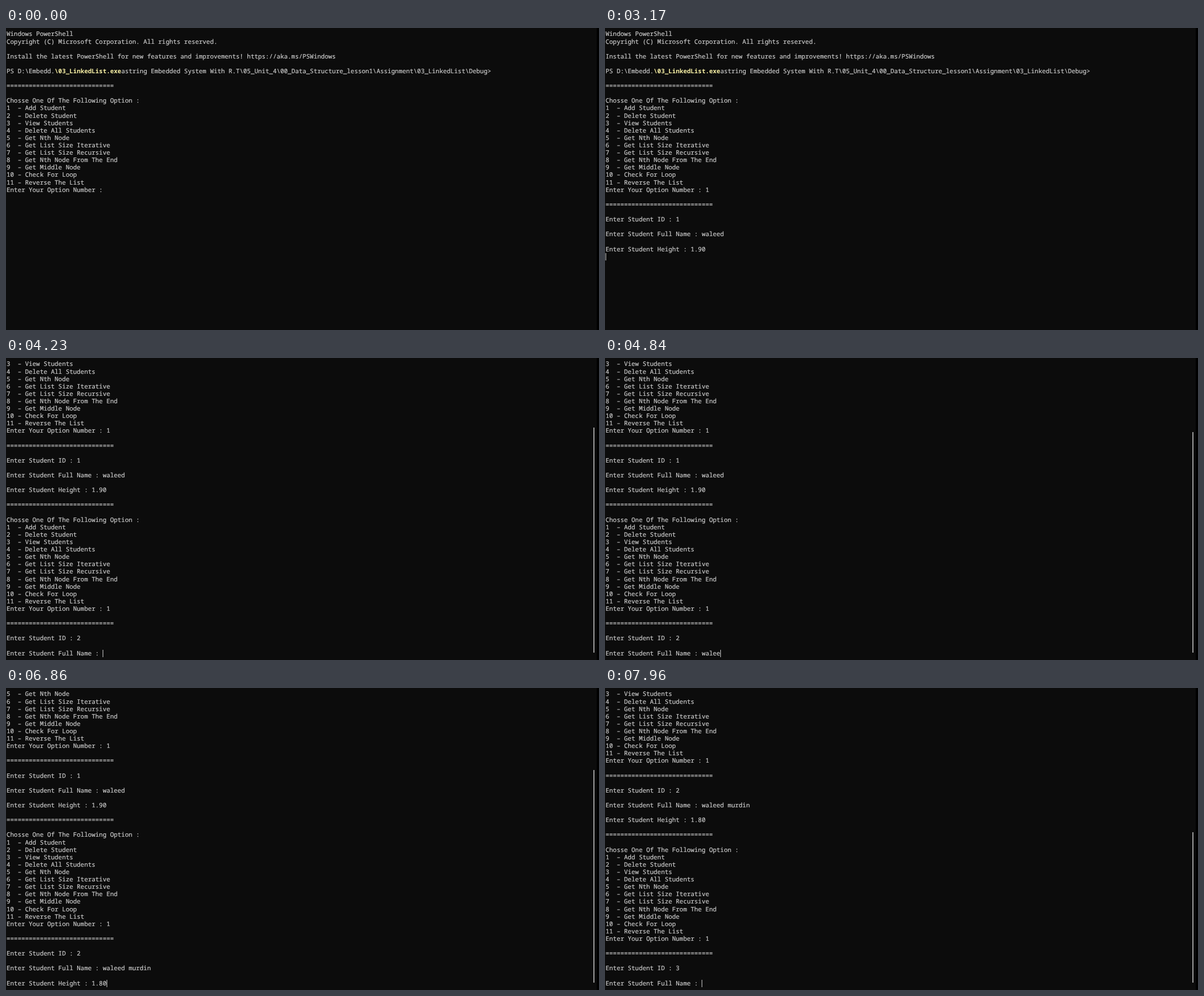
An HTML page that plays this animation: 1049 by 534 pixels, repeating every 8000 ms.

```html
<!DOCTYPE html>
<html lang="en">
<head>
<meta charset="utf-8">
<title>Linked list console</title>
<style>
  html, body { margin: 0; width: 100%; height: 100%; overflow: hidden; background: #0c0c0c; }
  #stage { position: relative; width: 1049px; height: 534px; overflow: hidden; }
  #stage > * { position: absolute; }
  pre {
    left: 1px; top: 4.4px; margin: 0; color: #ccc;
    font: 500 10.927px/13.112px "Noto Sans Mono", "DejaVu Sans Mono", monospace;
    text-rendering: geometricPrecision; font-variant-ligatures: none;
    -webkit-text-stroke: .2px;
  }
  b { color: #f9f1a5; -webkit-text-stroke: 0; }
  #caret { width: 1px; height: 13px; background: #ccc; }
  #edge { left: 1045px; top: 0; width: 4px; height: 534px; background: #000; }
  #thumb { left: 1039px; width: 2px; background: #9c9c9c; }
  #pointer { left: 0; top: 0; }
</style>
</head>
<body>
<div id="stage">
  <pre id="screen"></pre>
  <div id="caret"></div>
  <div id="edge"></div>
  <div id="thumb"></div>
  <svg id="pointer" width="5" height="9"><path d="M.5 .5h4M2.5 .5v8M.5 8.5h4" stroke="#ddd" fill="none"/></svg>
</div>
<script>
const LOOP = 8000, ROWS = 40, COL = 6.556, ROW = 13.112;
const [screenEl, caret, thumb, pointer] =
  ['screen', 'caret', 'thumb', 'pointer'].map(id => document.getElementById(id));

const RULE = '\n' + '='.repeat(29) + '\n';
const OPTIONS = ['Add Student', 'Delete Student', 'View Students', 'Delete All Students',
  'Get Nth Node', 'Get List Size Iterative', 'Get List Size Recursive',
  'Get Nth Node From The End', 'Get Middle Node', 'Check For Loop', 'Reverse The List'];
const MENU = RULE + '\nChosse One Of The Following Option :\n' +
  OPTIONS.map((label, i) => `${i + 1}`.padEnd(3) + `– ${label}\n`).join('') +
  'Enter Your Option Number : ';
const ID = '\nEnter Student ID : ';
const NAME = '\nEnter Student Full Name : ';
const HEIGHT = '\nEnter Student Height : ';
const COMMAND = String.raw`\03_LinkedList.exe`;
const INTRO = String.raw`Windows PowerShell
Copyright (C) Microsoft Corporation. All rights reserved.

Install the latest PowerShell for new features and improvements! https://aka.ms/PSWindows

PS D:\Embedd.${COMMAND}astring Embedded System With R.T\05_Unit_4\00_Data_Structure_lesson1\Assignment\03_LinkedList\Debug>
`;

// Spreads keystrokes evenly from start, one every step ms.
const type = (text, start, step) => [...text].map((key, i) => [start + i * step, key]);

// '\b' removes the last character.
const OUTPUT = [
  [0, INTRO + MENU],
  [1630, '1'], [1730, '\n'], [1830, RULE], [1920, ID],
  [2040, '1'], [2075, '\n'], [2110, NAME],
  ...type('waleed', 2270, 48), [2580, '\n'], [2670, HEIGHT],
  ...type('1.90', 2840, 65), [3120, '\n'], [3230, MENU],
  [3540, '1'], [3610, '\n'], [3690, RULE], [3870, ID],
  [4030, '2'], [4130, '\n'], [4230, NAME],
  ...type('walee', 4500, 80), ...type('d murdn', 4870, 45),
  [5280, '\b'], [5380, 'i'], [5480, 'n'], [6020, '\n'], [6120, HEIGHT],
  [6480, '1'], ...type('.80', 6660, 80), [6920, '\n'], [7010, MENU],
  [7500, '1'], [7590, '\n'], [7680, RULE + ID],
  [7770, '3'], [7870, '\n' + NAME]
];

// The scrollbar only catches up with the text at these moments.
const SCROLL_SYNC = [0, 3350, 3540, 3770, 3870, 4130, 4330, 6120, 7040, 7590, 7680, 7960];
const CARET_OFF = [[0, 870], [5720, 5880], [6310, 6480], [7210, 7300]];

function linesAt(time) {
  let text = '';
  for (const [at, chunk] of OUTPUT) {
    if (at > time) break;
    text = chunk === '\b' ? text.slice(0, -1) : text + chunk;
  }
  return text.split('\n');
}

function drawPointer(time) {
  pointer.style.display = time >= 30 && time < 1630 ? '' : 'none';
  const t = Math.floor((time - 30) / 92) * 92;
  const enter = 1 - (1 - Math.min(1, t / 736)) ** 2;
  const drift = Math.max(0, Math.min(1, (t - 736) / 720));
  const x = 909 - 546 * enter - 37 * drift;
  const y = 520.5 - 118.5 * enter - 39 * drift;
  pointer.style.transform = `translate(${Math.round(x)}px, ${Math.round(y)}px)`;
}

function draw(time) {
  const lines = linesAt(time);
  const visible = lines.slice(-ROWS);
  const html = visible.join('\n').replace(COMMAND + 'a', `<b>${COMMAND}</b>a`);
  if (screenEl.dataset.html !== html) screenEl.innerHTML = screenEl.dataset.html = html;

  caret.style.left = 1 + visible.at(-1).length * COL + 'px';
  caret.style.top = 4.5 + (visible.length - 1) * ROW + 'px';
  caret.style.display = CARET_OFF.some(([from, to]) => time >= from && time < to) ? 'none' : '';

  const total = linesAt(SCROLL_SYNC.findLast(at => at <= time)).length;
  const top = 524 - 511 * ROWS / total;
  thumb.style.display = total > ROWS ? '' : 'none';
  thumb.style.top = top + 'px';
  thumb.style.height = 521 - top + 'px';

  drawPointer(time);
}

const start = performance.now();
function tick() {
  draw((performance.now() - start) % LOOP);
  requestAnimationFrame(tick);
}
tick();
</script>
</body>
</html>
```
